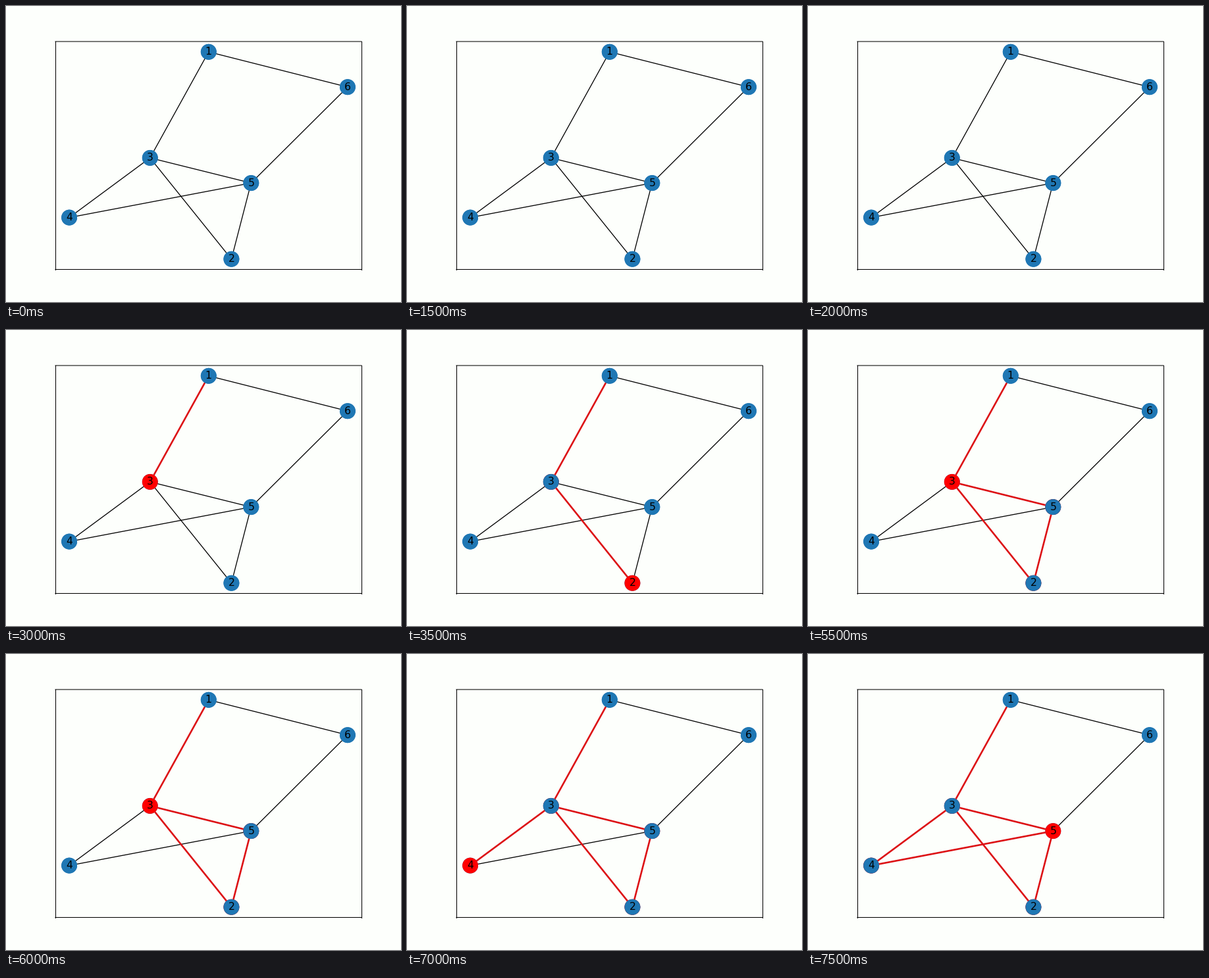
Recreate the animation shown at these times as a matplotlib script. Size 600 by 450 pixels, loop 8000 ms.

```python
from itertools import pairwise

import matplotlib.pyplot as plt
from matplotlib.animation import FuncAnimation
from matplotlib.patches import Circle

BACK = "#fdfffc"
BLUE = "#1f77b4"
RED = "#ff0000"
EDGE_RED = "#de1216"
RADIUS = 11.3

# Node centres in stage pixels, y pointing down
POINTS = [(307.8, 69.75), (342.4, 384.75), (218.8, 230.9),
          (96.1, 321.6), (372.3, 269.1), (518.9, 123.2)]
NODES = dict(enumerate(POINTS, start=1))

# The closed walk passes every edge of the graph once
CIRCUIT = [1, 3, 2, 5, 3, 4, 5, 6, 1]

FRAMES = 16
INTERVAL = 500
FIRST_STEP = 5       # frame on which the walk takes its first edge
FRAMES_PER_STEP = 2

fig = plt.figure(figsize=(6.4, 4.8), dpi=93.75, facecolor=BACK)
ax = fig.add_axes([0.125, 0.11, 0.775, 0.77], facecolor=BACK)
ax.set(xlim=(75, 540), ylim=(400.5, 54), xticks=[], yticks=[])
ax.spines[["top", "bottom"]].set_snap(False)


def draw_edge(a, b, color, width, zorder):
    xs, ys = zip(NODES[a], NODES[b])
    return ax.plot(xs, ys, color=color, lw=width, zorder=zorder)[0]


def draw_node(n, color, zorder):
    return ax.add_patch(Circle(NODES[n], RADIUS, fc=color, ec=color,
                               lw=1, zorder=zorder))


trail = []
for a, b in pairwise(CIRCUIT):
    draw_edge(a, b, "black", 1, 1)
    trail.append(draw_edge(a, b, EDGE_RED, 2, 1.5))

marks, covers = {}, {}
for n, (x, y) in NODES.items():
    draw_node(n, BLUE, 2)
    marks[n] = draw_node(n, RED, 3)
    covers[n] = draw_node(n, BLUE, 4)
    ax.text(x, y, str(n), size=12, family="DejaVu Sans", color="black",
            ha="center", va="center", zorder=5)


def update(frame):
    steps = max(0, (frame - FIRST_STEP) // FRAMES_PER_STEP + 1)
    visited = CIRCUIT[1:steps + 1]
    current = visited[-1] if visited else None
    for i, line in enumerate(trail):
        line.set_visible(i < steps)
    for n in NODES:
        marks[n].set_visible(n in visited)
        covers[n].set_visible(n != current)
    return [*trail, *marks.values(), *covers.values()]


anim = FuncAnimation(fig, update, frames=FRAMES, interval=INTERVAL,
                     repeat=True, repeat_delay=0, blit=False)
plt.show()
```
